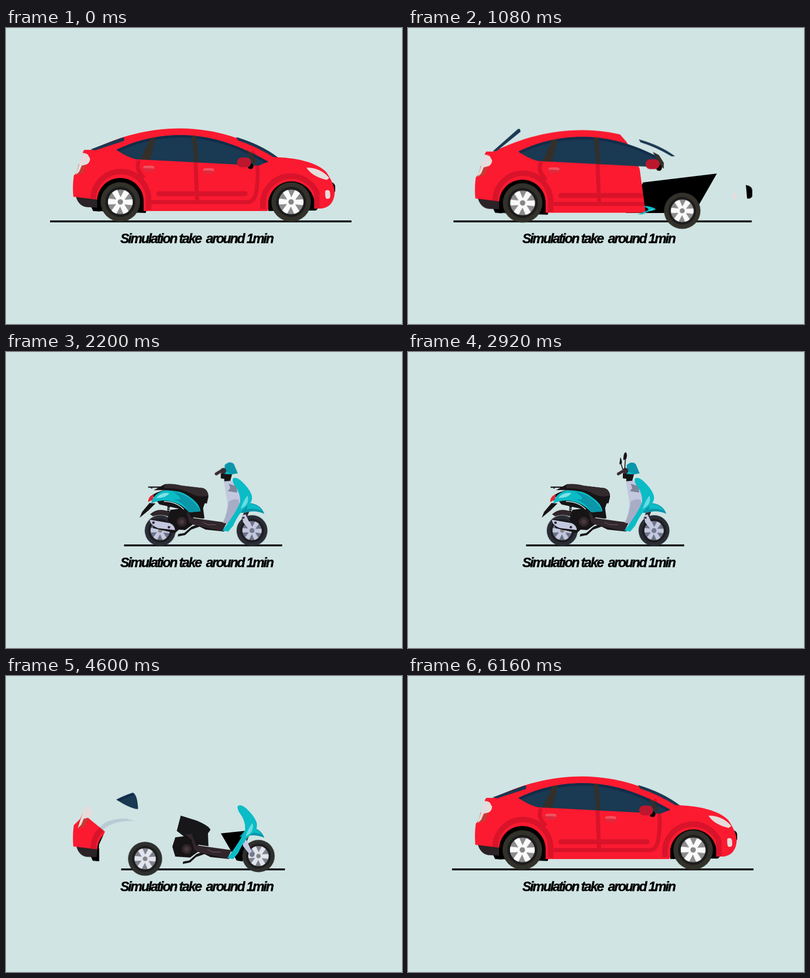
Write an HTML page that moves like this. It is 800 by 600 pixels and loops after 6.2 s.

```html
<!DOCTYPE html>
<html lang="en">
<head>
<meta charset="utf-8">
<title>Car and scooter</title>
<style>
html, body { margin: 0; width: 100%; height: 100%; overflow: hidden; background: #d0e4e3; }
svg { display: block; width: 800px; height: 600px; }
text { font: italic 700 27px "Liberation Sans", Arial, sans-serif; letter-spacing: -2.45px; white-space: pre; stroke: #000; stroke-width: .5px; }

.a { animation: 6200ms ease-in-out infinite; }
.road { animation-name: road; animation-timing-function: cubic-bezier(.65,0,.35,1); }
.bob { animation-name: bob; }
.cut { animation-name: cut; }
.glass { animation-name: glass; }
.chassis { animation-name: chassis; }
.rear { animation-name: rear, paint; }
.front { animation-name: front, paint; }
.tail { animation-name: tail; transform-origin: 150px 285px; }
.bumper { animation-name: bumper; transform-origin: 160px 352px; }
.hatch { animation-name: hatch; transform-origin: 173px 247px; }
.screen { animation-name: screen; transform-origin: 466px 222px; }
.pillar { animation-name: pillar; transform-origin: 498px 262px; }
.mirror { animation-name: mirror; transform-origin: 481px 272px; }
.nose { animation-name: nose; transform-origin: 660px 324px; }
.fog { animation-name: fog; transform-origin: 650px 338px; }
.lamp { animation-name: lamp; transform-origin: 630px 295px; }
.grip1 { animation-name: grip1; transform-origin: 289px 284px; }
.grip2 { animation-name: grip2; transform-origin: 410px 289px; }
.swoosh { animation-name: swoosh; transform-origin: 172px 345px; }
.ride { animation-name: ride; }
.shift { animation-name: shift; }
.shield { animation-name: shield; transform-origin: 437px 363px; }
.pop1 { animation-name: pop1; }
.pop2 { animation-name: pop2; }
.pop3 { animation-name: pop3; }
.pop4 { animation-name: pop4; }

@keyframes road {
  0%, 16%, 82.5%, 100% { transform: translateX(88.5px) scaleX(609); }
  25.5%, 72.2% { transform: translateX(238.5px) scaleX(319.5); }
}
@keyframes bob {
  0%, 10.3%, 100% { transform: none; }
  5%, 12.26%, 87.74% { transform: translateY(-1.5px); }
  17.42%, 83% { transform: translateY(3.5px); }
  92.9% { transform: translateY(.5px); }
}
@keyframes cut {
  0%, 14%, 84.6%, 100% { d: path("M100 180L690 180L690 250L690 320L690 385L100 385Z"); }
  17.42%, 81.8% { d: path("M100 180L416 198L442 228L468 282L482 385L100 385Z"); }
  25.81% { d: path("M100 297L150 297L174 320L184 345L182 385L100 385Z"); }
  29.8%, 70.6% { d: path("M100 342L100 342L100 345L100 350L100 385L100 385Z"); }
  74.19% { d: path("M100 276L156 276L200 312L188 338L185 385L100 385Z"); }
}
@keyframes glass {
  0%, 15%, 84%, 100% { d: path("M200 180L540 180Q540 200 540 300L200 300Z"); }
  17.42%, 82% { d: path("M200 180L503 180Q503 200 503 300L200 300Z"); }
  25.81% { d: path("M200 180L238 240Q245 243 250 264L200 300Z"); }
  27.8%, 72% { d: path("M200 180L220 246Q221 247 221 250L200 300Z"); }
  74.19% { d: path("M200 180L256 233Q266 236 267 270L200 300Z"); }
}
@keyframes chassis {
  0%, 13%, 87%, 100% { d: path("M475 313L624 295L588 358L520 369L440 369Z"); }
  17.42%, 82% { d: path("M475 313L624 295L588 358L520 375L440 375Z"); }
  25.81% { d: path("M433 316L462 314L472 345L476 374L468 372Z"); }
  30%, 70% { d: path("M452 330L453 330L454 332L454 334L452 334Z"); }
  74.19% { d: path("M434 319L482 314L488 340L478 376L466 374Z"); }
}
@keyframes rear {
  0%, 15.8%, 83%, 100% { transform: translate(231px,352.5px); }
  17.42% { transform: translate(231.5px,354.5px); }
  21.8% { transform: translate(264px,370px) scale(.92); }
  25.81% { transform: translate(304px,365px) scale(.8); }
  29%, 71% { transform: translate(311.5px,362px) scale(.78); }
  74.19% { transform: translate(281px,370.5px) scale(.86); }
  77% { transform: translate(250px,369px) scale(.96); }
}
@keyframes front {
  0%, 14.6%, 82.6%, 100% { transform: translate(576px,352.5px); }
  17.42%, 79% { transform: translate(554px,370.5px) scale(.92); }
  21% { transform: translate(512px,371px) scale(.82); }
  25.81% { transform: translate(499px,362px) scale(.79); }
  29%, 71% { transform: translate(497px,362px) scale(.78); }
  74.19% { transform: translate(510px,365px) scale(.82); }
}
/* tyre = color, spokes = fill, gaps = stroke */
@keyframes paint {
  0%, 16%, 77%, 100% { color: #32312a; fill: #fafafa; stroke: #8d8d8d; }
  29%, 71% { color: #2a2c36; fill: #c3c8df; stroke: #6d7289; }
}
@keyframes tail {
  0%, 20%, 80%, 100% { transform: none; }
  25.81% { transform: translate(1px,13px) scale(.85); }
  29%, 71% { transform: translate(-6px,40px) scale(0); }
  74.19% { transform: translate(4px,7px); }
}
@keyframes bumper {
  0%, 22%, 76%, 100% { transform: none; }
  25.81%, 74.19% { transform: scale(.95,1); }
  29.5%, 71% { transform: scale(0); }
}
@keyframes hatch {
  0%, 12.5%, 87%, 100% { transform: none; }
  17.42%, 83% { transform: rotate(-21deg); }
  20.5%, 80.5% { transform: rotate(-24deg) scale(0); }
}
@keyframes screen {
  0%, 11%, 92%, 100% { transform: none; }
  17.42%, 83% { transform: translate(1px,1px) rotate(-2deg) scale(.86,.9); }
  20.5%, 80.5% { transform: scale(0); }
  87.74% { transform: translate(2px,0) rotate(-7deg); }
}
@keyframes pillar {
  0%, 13%, 86%, 100% { transform: none; }
  17.42%, 83% { transform: translate(11px,2px) scale(1.1); }
  20%, 81% { transform: translate(16px,0) scale(0); }
}
@keyframes mirror {
  0%, 12.5%, 87.5%, 100% { transform: none; }
  17.42%, 82.5% { transform: translate(13px,0); }
  20.5%, 80.5% { transform: translate(20px,4px) scale(0); }
}
@keyframes nose {
  0%, 11.5%, 88%, 100% { transform: none; }
  17.42%, 83.4% { transform: translate(29px,5px) scale(1.3,1.2); }
  22.5%, 79% { transform: translate(4px,10px) scale(0); }
}
@keyframes fog {
  0%, 12%, 88%, 100% { transform: none; }
  17.42%, 83% { transform: translate(10px,-1px) scale(.75,.8); }
  19.5%, 81% { transform: translate(12px,0) scale(0); }
}
@keyframes lamp {
  0%, 12%, 87%, 100% { transform: none; }
  16.2%, 83.8% { transform: scale(0); }
}
@keyframes grip1 {
  0%, 10.3%, 94%, 100% { transform: none; }
  12.26%, 17.42%, 82%, 87.74% { transform: translateX(6.5px); }
  20%, 79.5% { transform: translateX(6px) scale(0); }
}
@keyframes grip2 {
  0%, 10.3%, 94%, 100% { transform: none; }
  12.26%, 87.74% { transform: translateX(7px); }
  16%, 84% { transform: translateX(8px) scale(0); }
}
@keyframes swoosh {
  0%, 21%, 79%, 100% { transform: none; opacity: 0; }
  25.81%, 74.19% { transform: none; opacity: 1; }
  31%, 69.5% { transform: translate(20px,-5px) scale(.8); opacity: 1; }
  35%, 66.5% { transform: translate(140px,0) scale(.1); opacity: 1; }
  35.1%, 66.4% { transform: translate(140px,0) scale(0); opacity: 0; }
}
@keyframes ride {
  0%, 38%, 47.1%, 56%, 100% { transform: none; }
  43%, 52% { transform: translateY(-1px); }
}
@keyframes shift {
  0%, 25.81%, 74.19%, 100% { transform: translate(10px,7px); }
  31%, 70% { transform: none; }
}
@keyframes shield {
  0%, 15.6%, 83%, 100% { transform: translate(20px,6px) scale(0); }
  17.42%, 81% { transform: translate(17px,8px) scale(.6,.16); }
  23.4%, 76% { transform: translate(2px,1px) scale(1,1.05); }
  25.81%, 74.19% { transform: none; }
}
@keyframes pop1 {
  0%, 18.2%, 81.2%, 100% { transform: scale(0); }
  23.8%, 76% { transform: scale(1.05); }
  25.81%, 74.19% { transform: none; }
}
@keyframes pop2 {
  0%, 26.2%, 73.6%, 100% { transform: scale(0); }
  31.4%, 68.5% { transform: scale(1.05); }
  33.5%, 66.5% { transform: none; }
}
@keyframes pop3 {
  0%, 31%, 69.5%, 100% { transform: scale(0); }
  36.2%, 64.8% { transform: scale(1.05); }
  38.5%, 63% { transform: none; }
}
@keyframes pop4 {
  0%, 39%, 62.3%, 100% { transform: scale(0); }
  42.2%, 59.5% { transform: none; }
}
</style>
</head>
<body>
<svg viewBox="0 0 800 600">
  <defs>
    <clipPath id="bodyCut"><path class="a cut" d="M100 180H690V385H100Z"/></clipPath>
    <clipPath id="glassCut"><path class="a glass" d="M200 180H540V300H200Z"/></clipPath>
    <clipPath id="glassShape"><path id="pane" d="M223 247C268 225 312 217 355 217C420 218 475 240 530 271L510 279L262 266Q245 262 223 247Z"/></clipPath>
    <path id="spoke" d="M-4 0L-6 -24.300Q0 -26 6 -24.300L4 0Z"/>
    <g id="wheel">
      <circle r="40" fill="currentColor" stroke="none"/>
      <circle r="30.5" fill="#1c1c1d" stroke="none"/>
      <circle r="12.5" fill="none" stroke-width="25"/>
      <g stroke="none" transform="rotate(32)">
        <use href="#spoke"/>
        <use href="#spoke" transform="rotate(60)"/>
        <use href="#spoke" transform="rotate(120)"/>
        <use href="#spoke" transform="rotate(180)"/>
        <use href="#spoke" transform="rotate(240)"/>
        <use href="#spoke" transform="rotate(300)"/>
        <circle r="10"/>
      </g>
      <circle r="5.5" fill="#858585" stroke="none"/>
    </g>
  </defs>

  <rect class="a road" y="390" width="1" height="4" fill="#171717"/>
  <text x="231" y="436">Simulation take  around 1min</text>

  <path class="a swoosh" fill="#b8cbd6" d="M170 347Q180 287 242 289L262 294Q208 291 187 322Q178 334 170 347Z"/>
  <path class="a chassis" d="M475 313L624 295L588 358L520 369L440 369Z"/>

  <!-- car -->
  <g class="a bob">
    <g class="a nose"><path d="M655 312Q664 314 665 320V331Q663 336 657 335Z"/></g>
    <g class="a bumper">
      <path d="M164 346H190V372L176 371Z"/>
      <path d="M141 341L186 346L184 364L162 363Q146 360 141 341Z" fill="#2b2226"/>
    </g>
    <g clip-path="url(#bodyCut)">
      <path d="M176 364L182 371L282 375L286 364ZM530 370H626L632 364Z"/>
      <path fill="#fb1a30" d="M158 247H172C230 220 285 203.5 352 203.5C425 204 485 225 549 262C592 264 628 273 647 292Q664 317 664 334Q662 362 638 366H622L600 330H550L528 371H278L265 330H195L186 348L136 342Q134 320 137 299L150 286L160 262L155 252Z"/>
      <path fill="#000" d="M184 365V351A47 47 0 0 1 278 351V372L250 374ZM530 371V351A47 47 0 0 1 623 351V369Z"/>
      <g fill="none" stroke="#d8132a" stroke-width="11">
        <path d="M176 346A56 57 0 0 1 288 350V369"/>
        <path d="M519 367V350A57 56 0 0 1 628 334V365"/>
        <path stroke-width="8" d="M269 268Q260 286 279 304M383 272L386 350M497 250Q513 276 507 320Q505 353 488 353H294"/>
        <path stroke-width="10" stroke-linecap="round" d="M309 336H483"/>
      </g>
    </g>
    <g class="a lamp"><path fill="#e6dcdb" d="M607 283Q636 283 653 304L648 308Q618 301 607 283Z"/></g>
    <g class="a fog"><path fill="#e6dcdb" d="M645 330Q655 325 655 338Q656 348 647 346Q644 341 645 330Z"/></g>
    <g class="a tail">
      <path fill="#c83a34" d="M147 276L163 274L156 294L141 299Z"/>
      <path fill="#e6dcdb" d="M157 253L165 256L170 265Q169 275 161 277L153 279L148 291L141 298L149 272Z"/>
    </g>
    <g clip-path="url(#glassCut)">
      <use href="#pane" fill="#1a3952"/>
      <g clip-path="url(#glassShape)">
        <path fill="none" stroke="#112c49" stroke-width="10" d="M223 247C268 225 312 217 355 217C420 218 475 240 530 271"/>
        <path fill="#33302b" d="M292 222L303 220L291 270H270ZM375 215H384L389 276H381Z"/>
      </g>
    </g>
    <g class="a pillar"><path fill="#33302b" d="M485 247L496 253L505 267V278L497 272Z"/></g>
    <g class="a hatch"><path fill="#1a3952" d="M171 246L235 222Q241 221 238 229L180 248Z"/></g>
    <g class="a screen"><path fill="#1a3952" d="M465 221Q515 236 549 262L541 262Q503 239 469 228Z"/></g>
    <g class="a mirror">
      <circle cx="494" cy="280" r="6"/>
      <rect x="467" y="262.500" width="28" height="20" rx="9" fill="#bd172d"/>
    </g>
    <g fill="#f0525f">
      <path class="a grip1" d="M277 284Q277 279 282 279H296Q300 280 300 285Z"/>
      <path class="a grip2" d="M398 289Q398 284 403 284H417Q421 285 421 290Z"/>
    </g>
    <g fill="#e02a3e">
      <path class="a grip1" d="M277 284L300 285Q299 291 294 291H283Q278 290 277 284Z"/>
      <path class="a grip2" d="M398 289L421 290Q420 296 415 296H404Q399 295 398 289Z"/>
    </g>
  </g>

  <use class="a rear" href="#wheel"/>
  <use class="a front" href="#wheel"/>

  <!-- scooter -->
  <g class="a ride">
    <g class="a pop2" style="transform-origin:310px 325px">
      <path fill="#171416" d="M270 336L275 324L290 306L302 307L288 321Z"/>
      <path fill="none" stroke="#171416" stroke-width="5" stroke-dasharray="3 1" d="M329 309L327 330"/>
      <path fill="#30262b" d="M291 329Q307 314 330 324L350 326V334H329Q312 327 297 333Z"/>
    </g>

    <g class="a shift">
      <g class="a pop1" style="transform-origin:385px 335px">
        <path fill="#171719" d="M343 276L375 286Q401 297 403 305L398 312L399 338L370 334L335 307Z"/>
        <path fill="#171416" d="M332 320L357 317L379 329L377 350L362 361L332 359L326 339Z"/>
        <circle cx="355" cy="344" r="10" fill="#30262b"/>
        <circle cx="355" cy="344" r="5" fill="#49373b"/>
        <path fill="#171416" d="M347 374L348 369L360 367L375 354L394 347L438 354L441 364L403 360L391 354L374 360L362 371Z"/>
        <path fill="#30262b" d="M352 314L365 313L374 336L446 346L437 363L378 350L370 345L365 325Z"/>
        <path fill="none" stroke="#675158" stroke-width="1.300" d="M397 345L408 350L424 350"/>
      </g>
    </g>

    <g class="a pop1" style="transform-origin:488px 330px">
      <path fill="none" stroke="#30262b" stroke-width="9" d="M487 322L480 339"/>
      <path fill="#c3c8df" d="M477 331L484 329L499 361L494 364L479 345Z"/>
      <circle cx="480" cy="336" r="2" fill="#30262b"/>
      <circle cx="497" cy="362" r="5" fill="#747990"/>
      <path fill="#0b96aa" d="M472 326L489 306Q514 307 522 328Q501 319 482 326Z"/>
      <path fill="#0bbcc6" d="M490 307Q510 309 517 322Q502 315 486 319Z"/>
    </g>

    <g class="a pop2" style="transform-origin:455px 310px">
      <path fill="#c3c8df" d="M440 262L456 260Q478 286 473 309L449 348L438 346Q448 323 447 304Z"/>
      <path fill="#a8adc6" d="M450 303Q462 296 470 300L473 311L449 348L438 346Q447 330 450 303Z"/>
      <path fill="#7f8499" d="M450 267L466 272L467 285L448 282L453 276Z"/>
    </g>

    <g class="a shift">
      <g class="a shield">
        <path fill="#0bbcc6" d="M458 257Q464 251 476 262Q491 276 496 289Q500 302 489 311Q472 323 459 352L449 364L437 362Q466 324 473 304Q474 287 463 272Q457 264 458 257Z"/>
        <path fill="#68dce1" d="M488 291Q493 309 474 318Q480 300 488 291Z"/>
      </g>
    </g>

    <g class="a pop2" style="transform-origin:345px 300px">
      <path fill="#171416" d="M295 290Q325 272 360 281L402 305L398 317L401 337L378 334L360 320L310 309Z"/>
      <path fill="#0bbcc6" d="M293 307Q297 287 321 280Q350 277 374 296Q391 308 393 323L370 325Q350 302 318 301Q304 302 293 307Z"/>
      <path fill="#0b96aa" d="M337 283Q374 289 393 323L370 325Q361 307 337 298Q367 303 337 283Z"/>
      <path fill="#80e1e5" d="M303 296Q314 283 330 286Q324 296 303 296Z"/>
      <path fill="none" stroke="#d9f5f5" stroke-width="1.500" d="M319 303Q344 303 359 319"/>
      <path fill="#e32635" d="M287 304Q288 291 299 289L296 300Z"/>
    </g>

    <g class="a pop3" style="transform-origin:350px 282px">
      <path fill="none" stroke="#171416" stroke-width="2.500" d="M288 274H322M295 274V277M312 274L309 279"/>
      <path fill="#171416" d="M299 280L321 268Q337 266 354 271L398 276Q409 281 408 294L405 307Q386 303 374 292Q350 278 299 280Z"/>
      <path fill="#332a2e" d="M320 269Q339 266 356 271L397 276Q407 280 408 291Q389 296 372 286Q351 275 320 276Z"/>
    </g>

    <g class="a pop3" style="transform-origin:316px 351px">
      <path fill="#171416" d="M291 338L338 347L350 359L341 367L298 357Z"/>
      <path fill="#c3c8df" d="M291 340L331 347Q341 352 341 361L307 357Q291 351 291 340Z"/>
      <g fill="#30262b"><circle cx="298" cy="346" r="2.500"/><circle cx="329" cy="355" r="2.500"/></g>
    </g>

    <g class="a pop3" style="transform-origin:448px 252px">
      <path fill="#171416" d="M434 246H457L453 261L441 262V257L434 256Z"/>
      <path fill="#0b96aa" d="M441 247L442 229Q452 220 460 227L468 246L457 248Z"/>
      <path fill="#0bbcc6" d="M441 247L442 240L456 248Z"/>
      <path fill="none" stroke="#3b2c31" stroke-width="6" stroke-linecap="round" d="M425 247L435 241"/>
      <circle cx="439" cy="241" r="6" fill="#3b2c31"/>
    </g>

    <g class="a pop4" style="transform-origin:438px 238px" fill="#171416">
      <path fill="none" stroke="#171416" stroke-width="1.800" d="M438 238L439 217M434 238L430 226"/>
      <path d="M435 219Q435 204 440 203Q444 207 441 217ZM427 228L429 213Q433 221 432 226Z"/>
    </g>
  </g>
</svg>
</body>
</html>
```
